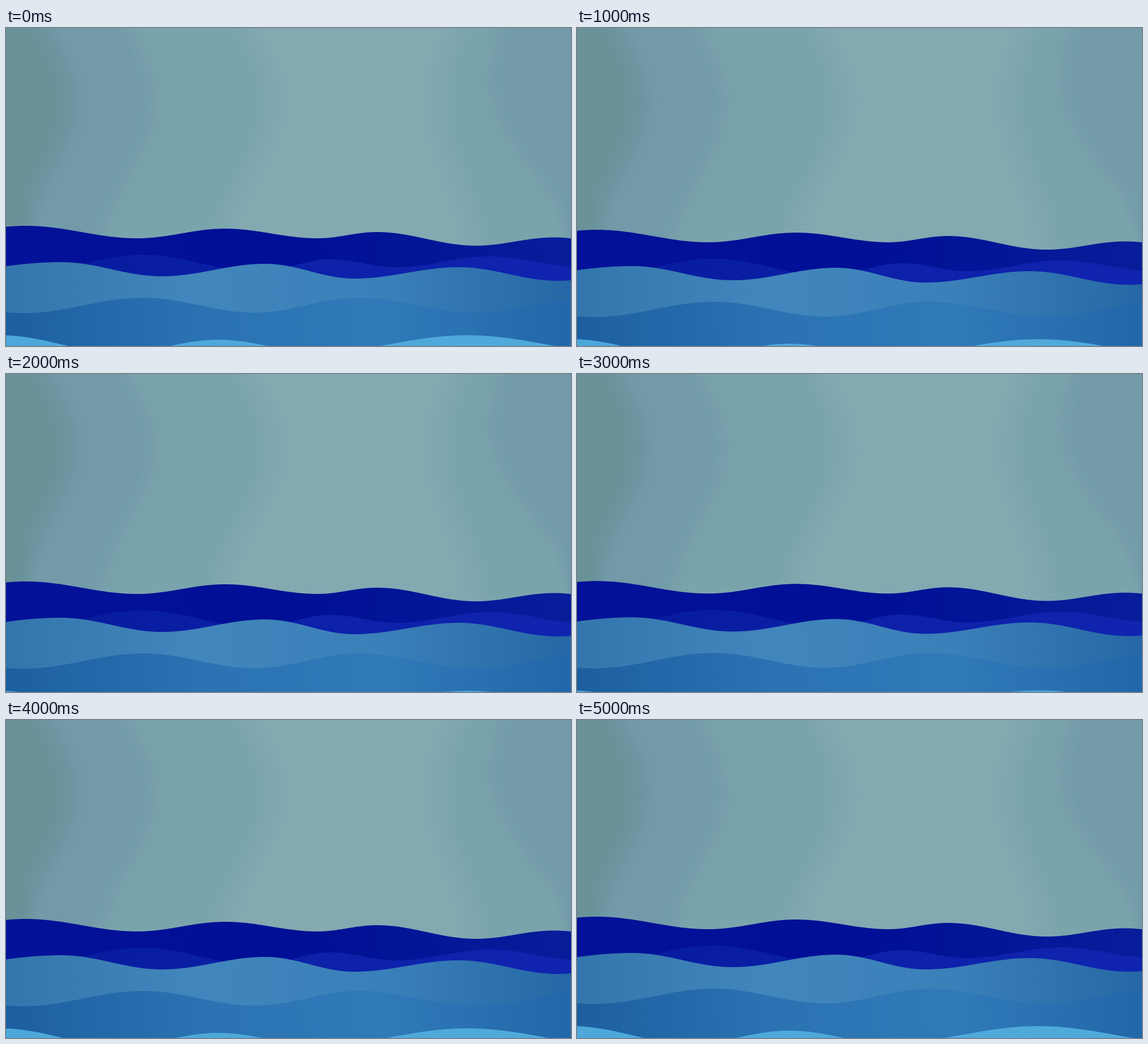
These frames come from a looping animation (998x561 px, 5500 ms). An HTML page with a canvas:

```html
<!DOCTYPE html>
<html lang="en">
<head>
<meta charset="utf-8">
<title>Paper waves</title>
<style>
  html, body { margin: 0; width: 100%; height: 100%; overflow: hidden; background: #7ba4ad; }
  canvas { display: block; width: 998px; height: 561px; }
</style>
</head>
<body>
<canvas id="stage" width="998" height="561"></canvas>
<script>
const W = 998, H = 561, STEP = 500, STEPS = 11;
const ctx = document.getElementById('stage').getContext('2d');

// Key poses of the rise and fall: [step, pixels down]
const bob = [[0, 0], [1, 4], [3, 10], [4, 17], [6, 16.3], [8, 2], [10, -2]];

// Back to front: colours spread evenly from left to right, crests and troughs of the edge
const sheets = [
  { colors: ['#031298', '#000f95', '#071d9a'],
    turns: [[35, 349], [232, 371], [387, 354], [550, 371], [655, 360], [830, 384], [968, 369.5]] },
  { colors: ['#061a9b', '#0c20a8', '#1024b0'],
    turns: [[240, 400], [445, 430], [572, 408], [690, 422], [855, 403]] },
  { colors: ['#3376ad', '#4186bc', '#3a80b9', '#2568a5'],
    turns: [[-180, 440], [97, 413], [275, 438], [458, 416], [615, 442], [800, 422], [975, 446]] },
  { colors: ['#1c5f9f', '#2a72b2', '#307ab8', '#2267a9'],
    turns: [[30, 503], [242, 476], [440, 502], [622, 476], [828, 502]] },
  { colors: ['#4da8da', '#4faada'],
    turns: [[-10, 542], [200, 573], [375, 550], [550, 572], [815, 542]] }
];

// Soft vertical bands of the backdrop; x is the left border, bent by sway and lean
const skyBands = [
  { x: 0, sway: 0, lean: 0, color: '#6a9299' },
  { x: 70, sway: 1, lean: 0, color: '#729aa9' },
  { x: 215, sway: 1, lean: 0, color: '#7aa4ac' },
  { x: 425, sway: 1, lean: 0, color: '#83a9b1' },
  { x: 795, sway: -.7, lean: 0, color: '#7aa4ac' },
  { x: 875, sway: -1, lean: .25, color: '#729aa9' }
];

const linear = t => t;
const wave = t => (1 - Math.cos(Math.PI * t)) / 2;

// Value at x between key points; wave easing keeps rolling past both ends
function along(points, x, ease) {
  let i = 0;
  while (i < points.length - 2 && x > points[i + 1][0]) i++;
  const [x0, y0] = points[i], [x1, y1] = points[i + 1];
  return y0 + (y1 - y0) * ease((x - x0) / (x1 - x0));
}

function across(colors) {
  const g = ctx.createLinearGradient(0, 0, W, 0);
  colors.forEach((color, i) => g.addColorStop(i / (colors.length - 1), color));
  return g;
}

function makeSky() {
  const sky = document.createElement('canvas');
  sky.width = W;
  sky.height = H;
  const c = sky.getContext('2d');
  const soft = 28;
  const place = x => Math.min(1, Math.max(0, x / W));
  for (let y = 0; y < H; y++) {
    const bend = 45 * Math.sin(Math.PI * y / 260);
    const g = c.createLinearGradient(0, 0, W, 0);
    skyBands.forEach((band, i) => {
      const x = band.x + band.sway * bend + band.lean * y;
      if (i) g.addColorStop(place(x - soft), skyBands[i - 1].color);
      g.addColorStop(place(x + soft), band.color);
    });
    c.fillStyle = g;
    c.fillRect(0, y, W, 1);
  }
  return sky;
}

const sky = makeSky();
for (const s of sheets) s.fill = across(s.colors);

function draw(step) {
  const drop = along(bob, step, linear);
  ctx.drawImage(sky, 0, 0);
  for (const s of sheets) {
    ctx.beginPath();
    ctx.moveTo(0, H + 10);
    for (let x = 0; x <= W; x += 2) ctx.lineTo(x, along(s.turns, x, wave) + drop);
    ctx.lineTo(W, H + 10);
    ctx.fillStyle = s.fill;
    ctx.fill();
  }
}

const start = performance.now();
function tick(now) {
  const time = Math.max(0, now - start);
  draw(Math.floor(time / STEP) % STEPS);
  requestAnimationFrame(tick);
}
draw(0);
requestAnimationFrame(tick);
</script>
</body>
</html>
```
